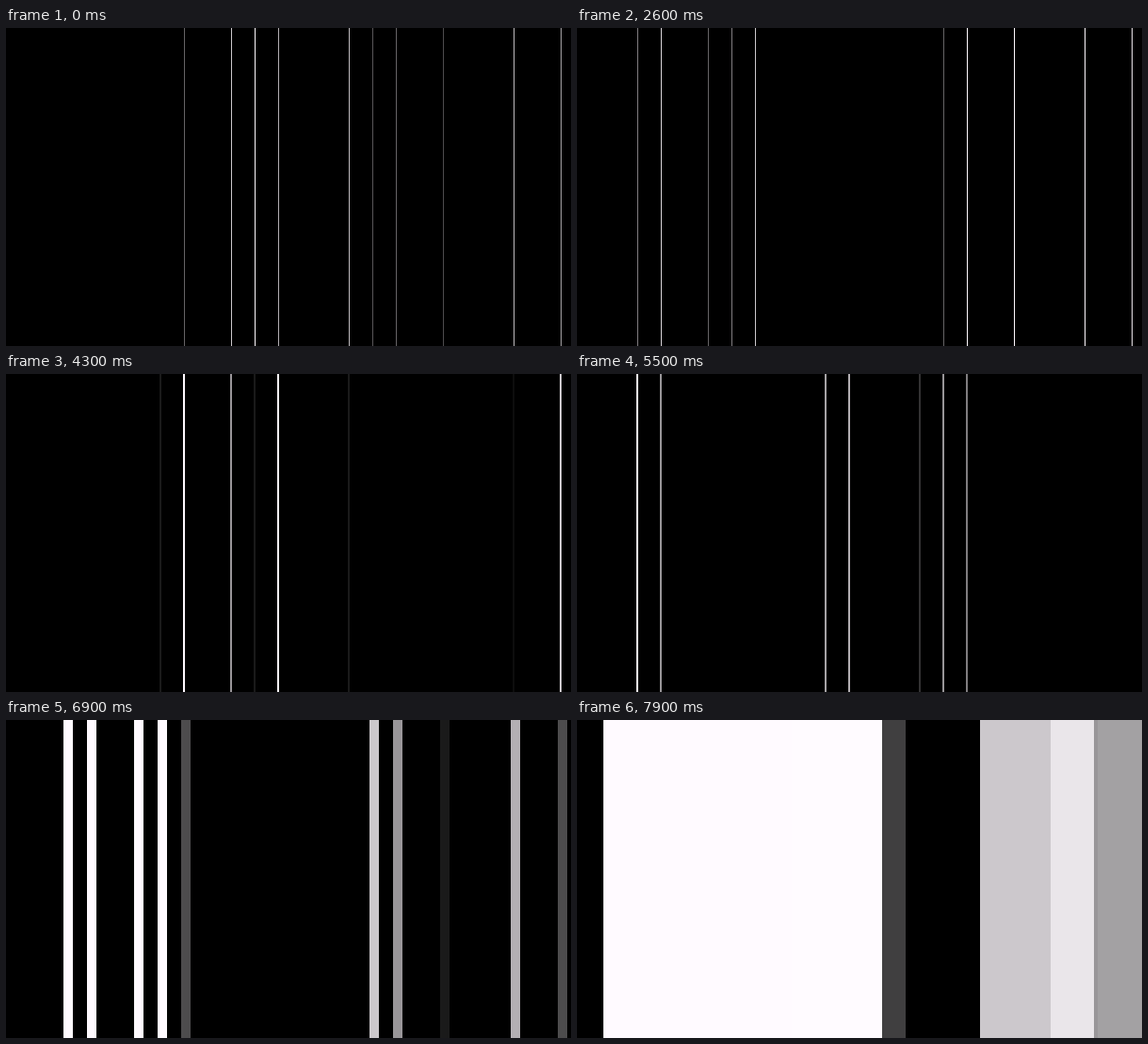
Animation of 600x338 px, one loop 8 s. Source, as an HTML page with a canvas:

```html
<!DOCTYPE html>
<html lang="en">
<head>
<meta charset="utf-8">
<title>Vertical bars</title>
<style>
  html, body { margin: 0; width: 100%; height: 100%; overflow: hidden; background: #000; }
  canvas { display: block; width: 600px; height: 338px; }
</style>
</head>
<body>
<canvas id="stage" width="600" height="338"></canvas>
<script>
const W = 600, H = 338, LOOP = 8000, STEP = 100;
const ORIGIN = 64, PITCH = 25, FADE = 1;

// Slot of each bar and the seconds at which it switches: on, off, on, ...
const BARS = {
  0: [1.5, 2.6, 5],
  1: [0.75, 2.95, 5.4],
  3: [2.7, 3.7, 6.2],
  4: [2.6, 3.9, 6.3],
  5: [-1, -0.1, 2.3, 4.9, 7.1],
  7: [-1, 0.3, 3.4, 4.4, 7.4],
  8: [-1, 0.95, 4.7, 5.65, 8.15],
  9: [-0.2, 1.65, 3.5, 5.7],
  12: [-0.25, 1.65, 4.7, 5.2],
  13: [0.15, 2.5, 5.4, 7.2],
  14: [0.1, 3.4, 5.5, 7],
  16: [0.2, 3.5, 7.3, 8.2],
  19: [-0.25, 3.85, 6.7, 8],
  21: [-0.15, 0.75, 2.2, 4.6, 7.1, 7.5]
};

const ctx = document.getElementById("stage").getContext("2d");
const clamp = v => Math.min(1, Math.max(0, v));

// Slow growth first, then a fast linear widening.
const barWidth = t => Math.max(1 + 0.04 * t * t, 10 + 110.7 * (t - 6.9));

// A linear fade centred on the nearest switch; short pulses stay partial.
function level(switches, t) {
  const gap = Math.min(...switches.map(s => Math.abs(t - s)));
  const on = switches.filter(s => s <= t).length % 2;
  return clamp(0.5 + (on ? gap : -gap) / FADE);
}

function draw(t) {
  const w = barWidth(t);
  ctx.globalAlpha = 1;
  ctx.fillStyle = "#000";
  ctx.fillRect(0, 0, W, H);
  ctx.fillStyle = "#fffaff";
  for (const [slot, switches] of Object.entries(BARS)) {
    ctx.globalAlpha = level(switches, t);
    ctx.fillRect(Math.round(ORIGIN + slot * PITCH - 0.3 * w), 0, Math.round(w), H);
  }
}

const start = performance.now();
function tick() {
  const ms = (performance.now() - start) % LOOP;
  draw(Math.floor(ms / STEP) * STEP / 1000);
  requestAnimationFrame(tick);
}
tick();
</script>
</body>
</html>
```
